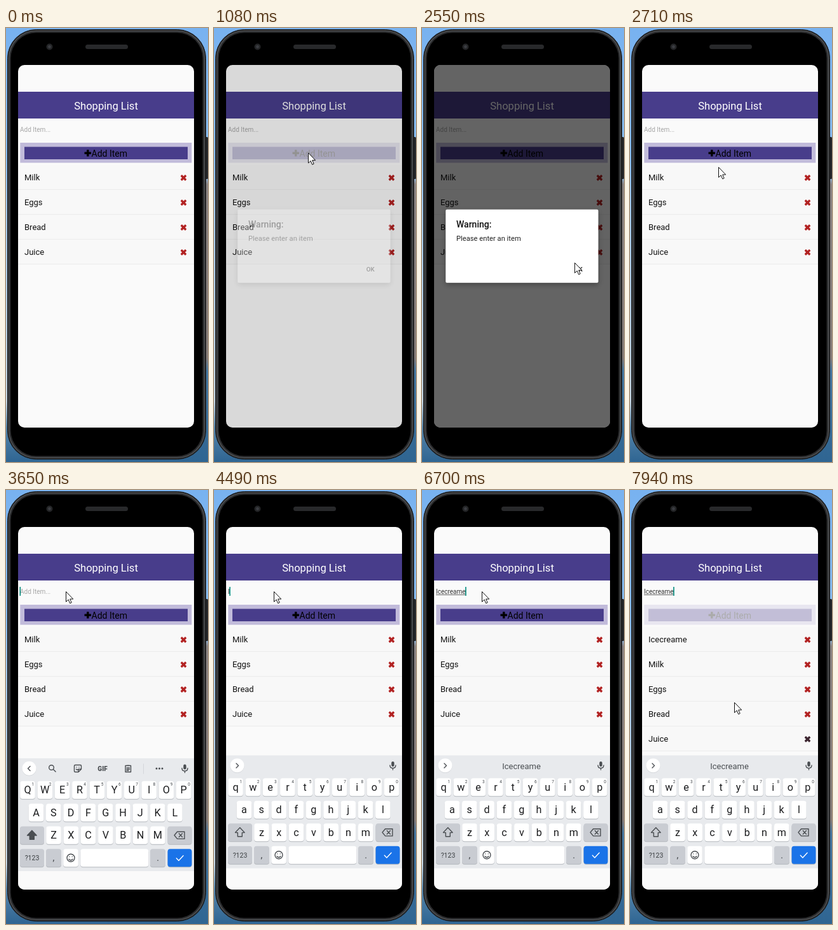
Animation, 318 px wide and 681 px high, one loop 8 s. Source, as an HTML page:

```html
<!DOCTYPE html>
<html lang="en">
<head>
<meta charset="utf-8">
<title>Shopping List</title>
<style>
html, body { margin: 0; width: 100%; height: 100%; overflow: hidden; background: #000; }
svg { display: block; width: 318px; height: 681px; }
text { font-family: Roboto, Arial, sans-serif; white-space: pre; }
.mid { text-anchor: middle; }
.line { fill: none; stroke: #4a4e52; stroke-width: 1.4; stroke-linecap: round; stroke-linejoin: round; }
</style>
</head>
<body>
<svg id="stage" viewBox="0 0 318 681" xmlns="http://www.w3.org/2000/svg"></svg>
<script>
const LOOP = 8000;
const PURPLE = '#483d8b';
const WORD = 'Icecreame';
const ROW = 39;

const rect = (x, y, w, h, fill, extra = '') =>
  `<rect x="${x}" y="${y}" width="${w}" height="${h}" fill="${fill}" ${extra}/>`;
const text = (x, y, size, fill, str, extra = '') =>
  `<text x="${x}" y="${y}" font-size="${size}" fill="${fill}" ${extra}>${str}</text>`;
const line = (d, extra = '') => `<path class="line" d="${d}" ${extra}/>`;
const bars = (x, y, angle) =>
  `<g transform="translate(${x} ${y}) rotate(${angle})">` +
  '<path d="M-4.6-1.7h2.9v-2.9q0-.7.7-.7h2q.7 0 .7.7v2.9h2.9q.7 0 .7.7v2q0 .7-.7.7H1.7v2.9q0 .7-.7.7h-2q-.7 0-.7-.7V1.7h-2.9q-.7 0-.7-.7v-2q0-.7.7-.7z"/></g>';

function gradient(id, stops) {
  const list = stops.map(([at, c]) => `<stop offset="${at}" stop-color="${c}"/>`).join('');
  return `<linearGradient id="${id}" x1="0" y1="0" x2="0" y2="1">${list}</linearGradient>`;
}

function phone() {
  return rect(0, 0, 159, 681, 'url(#west)') + rect(159, 0, 159, 681, 'url(#east)') +
    rect(312, 171, 6, 66, '#25272a', 'rx="1.5"') +
    rect(2.5, 2.5, 312, 674, '#2a2b2d', 'rx="45" stroke="#141516"') +
    rect(4.6, 4.6, 307.8, 669.8, 'none', 'rx="43" stroke="#515355" stroke-width="1.3"') +
    rect(7.5, 7.5, 302, 664, '#000', 'rx="40"') +
    '<circle cx="68.5" cy="29.5" r="5" fill="#242527"/><circle cx="68.5" cy="29.5" r="2.4" fill="#3b3d42"/>' +
    rect(125, 26, 67, 7, '#28292b', 'rx="3.5"');
}

function app() {
  const rows = [0, 1, 2, 3, 4].map(i => {
    const y = 235 + i * ROW;
    return `<g id="row${i}">` + rect(19, y - 20, 277, 39, '#f8f8f8') +
      rect(19, y + 18, 277, 1, '#ececec') +
      text(29, y + 4.3, 13, '#111', '', `id="item${i}"`) +
      `<g id="cross${i}" fill="#b22222">${bars(279.5, y, 45)}</g></g>`;
  }).join('');
  return rect(19, 58, 277, 569, '#fafafa') + rect(19, 100, 277, 42, PURPLE) +
    text(157.5, 128, 16.6, '#fff', 'Shopping List', 'class="mid"') +
    text(22, 163, 10, '#a8a8a8', 'Add Item...', 'id="hint"') +
    text(22, 163, 10, '#333', '', 'id="typed"') +
    text(0, 0, 10, 'none', '', 'id="probe"') +
    rect(22, 164, 0, .8, '#444', 'id="under"') +
    rect(22, 152, 1.6, 14, '#00897b', 'id="caret"') +
    '<g id="button">' + rect(22.3, 180, 270, 31.5, '#c1bbda') +
    rect(29, 186.5, 257, 19.5, PURPLE) + `<g fill="#000">${bars(128.8, 196.3, 0)}</g>` +
    text(134.5, 201.5, 14, '#000', 'Add Item') + '</g>' + rows;
}

function key(x, y, w, fill = '#fff') {
  return rect(x, y - 13, w, 28, '#b4b8bd', 'rx="4"') + rect(x, y - 14, w, 28, fill, 'rx="4"');
}

function keyRow(letters, first, y, digits) {
  return [...letters].map((c, i) => {
    const x = first + i * 27.3;
    return key(x - 11.8, y, 23.6) +
      text(x, y + 5.5, 16.2, '#1c1d1f', c, 'class="mid letter"') +
      (digits ? text(x + 8.3, y - 6.5, 6.5, '#44484c', (i + 1) % 10, 'class="mid"') : '');
  }).join('');
}

function keys() {
  const grey = '#c9ccd2';
  return keyRow('QWERTYUIOP', 34, 467, true) + keyRow('ASDFGHJKL', 47.5, 502.5) +
    key(22, 538, 38, grey) + keyRow('ZXCVBNM', 75, 538) + key(254.5, 538, 38, grey) +
    '<path id="shift" class="line" d="M40.8 530.5l7.3 7.8h-3.8v6.2h-7v-6.2h-3.8z"/>' +
    line('M265 538l4.6-5.6h11.4v11.2h-11.4zM272.3 535.3l5.2 5.4M277.5 535.3l-5.2 5.4') +
    key(22, 573.5, 38, grey) + text(41, 577.5, 10.5, '#3c4043', '?123', 'class="mid"') +
    key(63, 573.5, 24, grey) + text(75, 578.5, 14, '#3c4043', ',', 'class="mid"') +
    key(90.2, 573.5, 23.6) +
    '<circle class="line" cx="102" cy="573.5" r="6"/>' +
    line('M99 575.5q3 3.4 6 0M99.7 571.6h.1M104.3 571.6h.1') +
    key(117.3, 573.5, 107) +
    key(227, 573.5, 24, grey) + text(239, 578.5, 14, '#3c4043', '.', 'class="mid"') +
    key(254.5, 573.5, 38, '#1a73e8') +
    line('M268.3 574l3.6 3.6 7.2-7.6', 'style="stroke:#fff"');
}

function keyboard() {
  const tools =
    '<g id="tools">' +
    '<circle class="line" cx="71.5" cy="431" r="3.8"/>' + line('M74.5 434l3.6 3.6') +
    line('M109 427h8q1.5 0 1.5 1.5v5l-4.5 4.5h-5q-1.5 0-1.5-1.5v-8q0-1.5 1.5-1.5M114 438v-3q0-1.5 1.5-1.5h3M110.5 433.5q1.5 2 3.5 0M111 430.5h.1M115 430.5h.1') +
    text(152, 436, 10, '#4a4e52', 'GIF', 'class="mid" font-weight="900"') +
    line('M188 428h8.5v10H188zM190.5 427.6h3.6M190 431.5h4.5M190 433.7h4.5M190 435.8h3') +
    rect(216, 425, 1, 16, '#d3d6da') +
    [237, 241.5, 246].map(x => `<circle cx="${x}" cy="432.5" r="1.5" fill="#4a4e52"/>`).join('') +
    '</g>';
  const words = [81, 156.5, 232].map((x, i) =>
    text(x, 437.5, 13, '#4a4e52', '', `class="mid" id="word${i}"`)).join('');
  return '<g id="keyboard">' + rect(19, 416.5, 277, 420, '#fafafa') +
    rect(19, 416.5, 277, 177, '#e8eaed') +
    '<circle cx="36.5" cy="433" r="11" fill="#cfd2d6"/><circle cx="36.5" cy="432.3" r="11" fill="#fff"/>' +
    line('', 'id="chevron"') + tools + words +
    `<g id="split">${rect(116, 425, 1, 16, '#cdd0d4')}${rect(196, 425, 1, 16, '#cdd0d4')}</g>` +
    rect(279.3, 426, 4.4, 8, '#4a4e52', 'rx="2.2"') +
    line('M277 432q0 4.5 4.5 4.5t4.5-4.5M281.5 436.5v2.5') +
    `<g transform="translate(0 -.7)">${keys()}</g></g>`;
}

function dialog() {
  return rect(19, 58, 277, 569, '#000', 'id="dim"') + '<g id="dialog">' +
    rect(37.3, 284.8, 240.2, 115, '#fff', 'rx="2" filter="url(#shadow)"') +
    text(54, 312.8, 14, '#111', 'Warning:', 'font-weight="500"') +
    text(54, 334, 11.2, '#222', 'Please enter an item') +
    text(246.3, 381.6, 9.8, '#111', 'OK', 'class="mid" font-weight="500"') + '</g>';
}

document.getElementById('stage').innerHTML = '<defs>' +
  gradient('west', [[0, '#78b2f0'], [.3, '#86bcf1'], [.42, '#a3c8ea'], [.86, '#c3d3df'], [.92, '#5585ab'], [1, '#2f6592']]) +
  gradient('east', [[0, '#78b2f0'], [.34, '#8cbff0'], [.36, '#8a8382'], [.76, '#847a76'], [.79, '#44769f'], [1, '#2f6592']]) +
  '<clipPath id="screen"><rect x="19" y="58" width="277" height="569" rx="10"/></clipPath>' +
  '<filter id="shadow" x="-20%" y="-20%" width="140%" height="150%">' +
  '<feDropShadow dx="0" dy="3" stdDeviation="4" flood-opacity=".32"/></filter></defs>' +
  phone() + '<g clip-path="url(#screen)">' + app() + keyboard() + dialog() + '</g>' +
  '<path id="pointer" d="M.5.5V16.4L4.2 13l2.5 5.8 2.5-1.1-2.5-5.6h5z" fill="#fff" stroke="#111" stroke-linejoin="round"/>';

const el = {};
document.querySelectorAll('#stage [id]').forEach(n => el[n.id] = n);
const letters = document.querySelectorAll('.letter');

const clamp = v => Math.max(0, Math.min(1, v));
const ramp = (t, a, b) => clamp((t - a) / (b - a));
const show = (node, on) => node.setAttribute('display', on ? 'inline' : 'none');
const put = (node, str) => { if (node.textContent !== str) node.textContent = str; };

// time, x, y of the pointer tip
const path = [
  [70, 277, 627], [250, 250, 510], [480, 190, 320], [700, 138, 190], [850, 148, 195.5],
  [1400, 148, 195.5], [1500, 140, 196], [1750, 205, 310], [1930, 252, 386], [2000, 254, 377],
  [2180, 254, 377], [2250, 245, 376], [2390, 245, 376], [2400, 240, 368], [2630, 240, 368],
  [2700, 139, 218], [2790, 139, 218], [3020, 97, 147], [3170, 95, 155], [3250, 94, 159],
  [7160, 94, 159], [7600, 166, 192], [7939, 166, 192], [7940, 164, 333]
];

function pointerAt(t) {
  const i = path.findIndex(p => p[0] > t);
  if (i < 0) return path[path.length - 1].slice(1);
  const a = path[Math.max(0, i - 1)], b = path[i];
  const p = ramp(t, a[0], b[0]);
  return [a[1] + (b[1] - a[1]) * p, a[2] + (b[2] - a[2]) * p];
}

// time, letters typed, letters underlined, suggestions
const typing = [
  [0, 0, 0, []],
  [4490, 1, 0, []],
  [4740, 1, 1, ['I', "I'm", "I'll"]],
  [4970, 3, 1, ['Ic', "I've", "I'll"]],
  [5200, 3, 3, ['Ice', "I've", 'Iced']],
  [5660, 4, 3, ['Ice', "I've", 'Iced']],
  [5830, 4, 4, ['Icec', 'Iced', 'Ice cream']],
  [5980, 5, 5, ['Icec', 'Iced', 'Ice cream']],
  [6150, 6, 6, ['Icecr', 'Iced', 'Ice cream']],
  [6300, 7, 7, ['Icecre', 'Iced', 'Ice cream']],
  [6450, 9, 7, ['Icecrea', 'Icecream', 'Ice creams']],
  [6700, 9, 9, ['', WORD, '']]
];

function widthOf(n) {
  put(el.probe, WORD.slice(0, n));
  return n ? el.probe.getComputedTextLength() : 0;
}

function drawInput(t) {
  const [, typed, marked, words] = typing.filter(s => s[0] <= t).pop();
  put(el.typed, WORD.slice(0, typed));
  show(el.hint, !typed);
  el.under.setAttribute('width', widthOf(marked));
  el.caret.setAttribute('x', 21.5 + widthOf(typed));
  const blink = (t >= 4260 && t < 4490) || (t >= 7160 && t < 7640);
  show(el.caret, t >= 3250 && !blink);

  for (let i = 0; i < 3; i++) put(el['word' + i], words[i] || '');
  show(el.split, typed && words[0]);
  show(el.tools, !typed);
  el.chevron.setAttribute('d', typed ? 'M35 429l3.5 3.5-3.5 3.5' : 'M38 429l-3.5 3.5 3.5 3.5');
  el.shift.style.fill = typed ? 'none' : '#4a4e52';
  letters.forEach(n => put(n, typed ? n.textContent.toLowerCase() : n.textContent.toUpperCase()));
}

function drawList(t) {
  const added = t >= 7940;
  const items = ['Milk', 'Eggs', 'Bread', 'Juice'];
  if (added) items.unshift(WORD);
  for (let i = 0; i < 5; i++) {
    show(el['row' + i], i < items.length);
    put(el['item' + i], items[i] || '');
  }
  el.cross4.setAttribute('fill', '#3d2630');
  const press = t < 2000 ? (t >= 930 ? 1 - ramp(t, 1080, 1220) : 0) : (t >= 7690 ? 1 : 0);
  el.button.setAttribute('opacity', 1 - .69 * press);
}

function render(t) {
  drawList(t);
  drawInput(t);

  const slide = 211 * (1 - ramp(t, 3410, 3800)) ** 4;
  show(el.keyboard, t >= 3480);
  el.keyboard.setAttribute('transform', `translate(0 ${slide.toFixed(2)})`);

  const open = t < 2000 ? (t >= 1080 ? ramp(t, 1030, 1258) : 0) : 1 - ramp(t, 2600, 2700);
  el.dim.setAttribute('opacity', .6 * open);
  el.dialog.setAttribute('opacity', clamp(open * 1.3));
  show(el.dim, open > 0);
  show(el.dialog, open > 0);

  const [x, y] = pointerAt(t);
  show(el.pointer, t >= 70);
  el.pointer.setAttribute('transform', `translate(${x.toFixed(1)} ${y.toFixed(1)})`);
}

const start = performance.now();
function tick() {
  render((performance.now() - start) % LOOP);
  requestAnimationFrame(tick);
}
tick();
</script>
</body>
</html>
```
